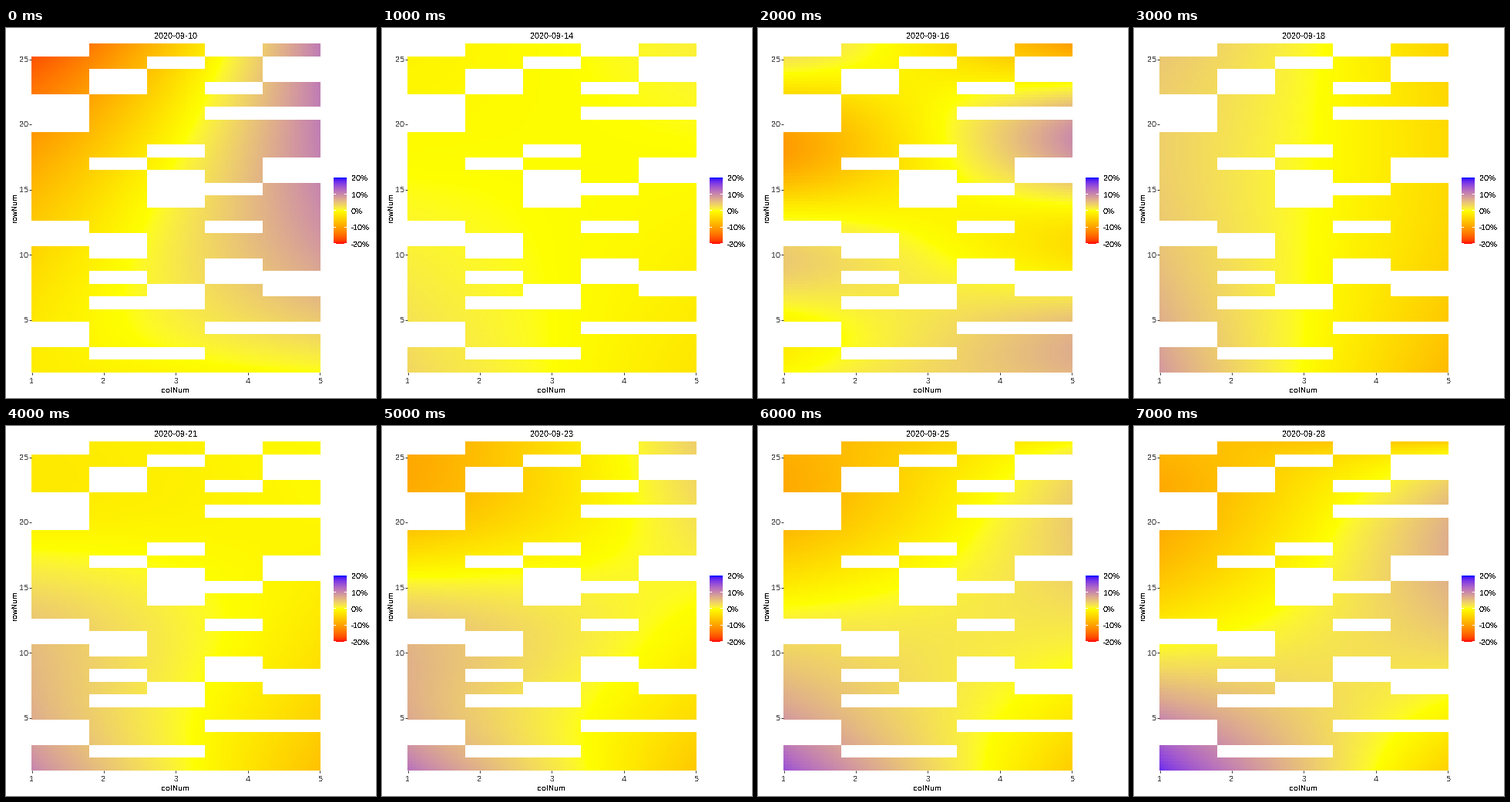
Recreate the animation shown at these times as a matplotlib script. Size 480 px wide and 480 px high, loop 8000 ms.

```python
import matplotlib.pyplot as plt
import numpy as np
from matplotlib.animation import FuncAnimation

SIZE = 480
DPI = 100
LEFT, RIGHT, TOP, BOTTOM = 33, 408, 20, 447
COLS, ROWS = 5, 26
CELLS_X, CELLS_Y = 100, 104
BAR = (425, 442, 194, 280)  # legend: left, right, top, bottom
DAYS = [10, 14, 16, 18, 21, 23, 25, 28]

# Empty rows in each column, counted from the top.
GAPS = [
    (0, 4, 5, 6, 14, 15, 22, 23),
    (2, 3, 9, 15, 16, 18, 20, 24),
    (1, 8, 10, 11, 12, 19, 20, 24),
    (0, 3, 5, 11, 14, 17, 18, 22),
    (1, 2, 5, 9, 10, 18, 19, 22),
]


def edges(day, y):
    """Percent change along the left and right edge; y runs 0 to 1 downwards."""
    if day == 10:
        return -2 - 16 * (1 - y) ** 1.8, 11.3 * (1 - y ** 3)
    if day == 14:
        return -1.2 + 4.7 * y ** 1.5, 1.2 - 4 * y
    if day == 16:
        left = -4 + 3.5 * y + 7.8 * (1 - y ** 4) * np.cos(9 * y + 0.27)
        right = 1 + 2 * y + 11.5 * np.exp(-1.1 * y) * np.cos(9.8 * (y - 0.3))
        return left, right
    if day == 18:
        return 4 + 10 * (y - 0.3) ** 2, -4 - 8 * (y - 0.35) ** 2
    if day == 23:
        left = -10.5 + 24 * y - 2.5 * np.sin(3 * np.pi * (y - 0.05))
        return left, 4 - 10 * y ** 1.3
    left = -7 + 25 * y ** 2 - 25 * y * (1 - y) ** 2
    return left, -6.5 + 1.5 * y + 13 * np.sin(np.pi * y ** 0.6)


def surface(day):
    if day in (21, 25):  # halfway between its neighbours
        i = DAYS.index(day)
        return (surface(DAYS[i - 1]) + surface(DAYS[i + 1])) / 2
    x = (np.arange(CELLS_X) + 0.5)[None, :] / CELLS_X
    y = (np.arange(CELLS_Y) + 0.5)[:, None] / CELLS_Y
    left, right = edges(day, y)
    return left + (right - left) * x ** (1.25 - 0.4 * y)


# sRGB to XYZ, scaled to the white point
TO_XYZ = np.array([[0.4124, 0.3576, 0.1805],
                   [0.2126, 0.7152, 0.0722],
                   [0.0193, 0.1192, 0.9505]])
TO_XYZ /= TO_XYZ.sum(axis=1, keepdims=True)
FROM_XYZ = np.linalg.inv(TO_XYZ)


def rgb_to_lab(rgb):
    # Only pure channels (0 or 1) are used, so no gamma step is needed.
    xyz = TO_XYZ @ np.array(rgb, float)
    x, y, z = np.where(xyz > 0.008856, np.cbrt(xyz), 7.787 * xyz + 16 / 116)
    return np.array([116 * y - 16, 500 * (x - y), 200 * (y - z)])


def lab_to_rgb(lab):
    y = (lab[..., 0] + 16) / 116
    f = np.stack([y + lab[..., 1] / 500, y, y - lab[..., 2] / 200], axis=-1)
    xyz = np.where(f > 0.2069, f ** 3, (f - 16 / 116) / 7.787)
    linear = np.clip(xyz @ FROM_XYZ.T, 0, 1)
    return np.where(linear > 0.0031308,
                    1.055 * linear ** (1 / 2.4) - 0.055, 12.92 * linear)


RED, YELLOW, BLUE = map(rgb_to_lab, [(1, 0, 0), (1, 1, 0), (0, 0, 1)])


def shade(percent):
    s = np.clip(percent / 20, -1, 1)[..., None]
    end = np.where(s < 0, RED, BLUE)
    return lab_to_rgb(YELLOW + np.abs(s) * (end - YELLOW))


def bins(start, stop, count):
    pixels = np.arange(stop - start) + 0.5
    return (pixels / (stop - start) * count).astype(int)


def base_picture():
    picture = np.ones((SIZE, SIZE, 3))
    x0, x1, y0, y1 = BAR
    picture[y0:y1, x0:x1] = shade(np.linspace(20, -20, y1 - y0))[:, None]
    for y in np.linspace(y0, y1 - 1, 5).round().astype(int)[1:]:
        picture[y, x0:x0 + 3] = 1
        picture[y, x1 - 3:x1] = 1
    return picture


def heat_map(day):
    picture = BASE.copy()
    cells = shade(surface(day))
    rows, cols = bins(TOP, BOTTOM, CELLS_Y), bins(LEFT, RIGHT, CELLS_X)
    picture[TOP:BOTTOM, LEFT:RIGHT] = cells[np.ix_(rows, cols)]
    for col, gaps in enumerate(GAPS):
        for row in gaps:
            picture[ROW_Y[row]:ROW_Y[row + 1], COL_X[col]:COL_X[col + 1]] = 1
    return picture


BASE = base_picture()
COL_X = np.linspace(LEFT, RIGHT, COLS + 1).astype(int)
ROW_Y = np.linspace(TOP + 0.35, BOTTOM - 0.43, ROWS + 1).round().astype(int)

plt.rcParams.update({
    "font.family": "Liberation Sans",
    "text.antialiased": False,
    "text.hinting": "native",
    "text.hinting_factor": 1,
})
fig = plt.figure(figsize=(SIZE / DPI, SIZE / DPI), dpi=DPI, facecolor="white")
ax = fig.add_axes([0, 0, 1, 1])
ax.set_axis_off()
image = ax.imshow(BASE, extent=(0, SIZE, SIZE, 0), interpolation="none", aspect="auto")
ax.set_xlim(0, SIZE)
ax.set_ylim(SIZE, 0)


def label(x, y, text, px=10, color="black", **kw):
    kw = {"ha": "center", "va": "baseline", **kw}
    return ax.text(x, y, text, fontsize=px * 72 / DPI, color=color, **kw)


def tick(xs, ys):
    ax.plot(xs, ys, color="#333333", lw=72 / DPI, solid_capstyle="butt")


GREY = "#4d4d4d"
for n in range(1, 6):
    x = 33.5 + (n - 1) * 93.4
    tick([x, x], [447, 450])
    label(x, 461, str(n), color=GREY)

    y = 463 - 84.5 * n
    tick([30, 33], [y, y])
    label(29, y + 3.5, str(5 * n), color=GREY, ha="right")

    y = BAR[2] + (n - 1) * 21.5
    label(448, y + 4, f"{30 - 10 * n}%", ha="left")

label(220, 473, "colNum")
label(11.5, 233, "rowNum", rotation=90, va="center")
title = label(220, 14, "", px=11)


def draw(frame):
    image.set_data(heat_map(DAYS[frame]))
    title.set_text(f"2020-09-{DAYS[frame]}")
    return image, title


anim = FuncAnimation(fig, draw, frames=len(DAYS), interval=1000, repeat=True,
                     repeat_delay=0, blit=False)
plt.show()
```
